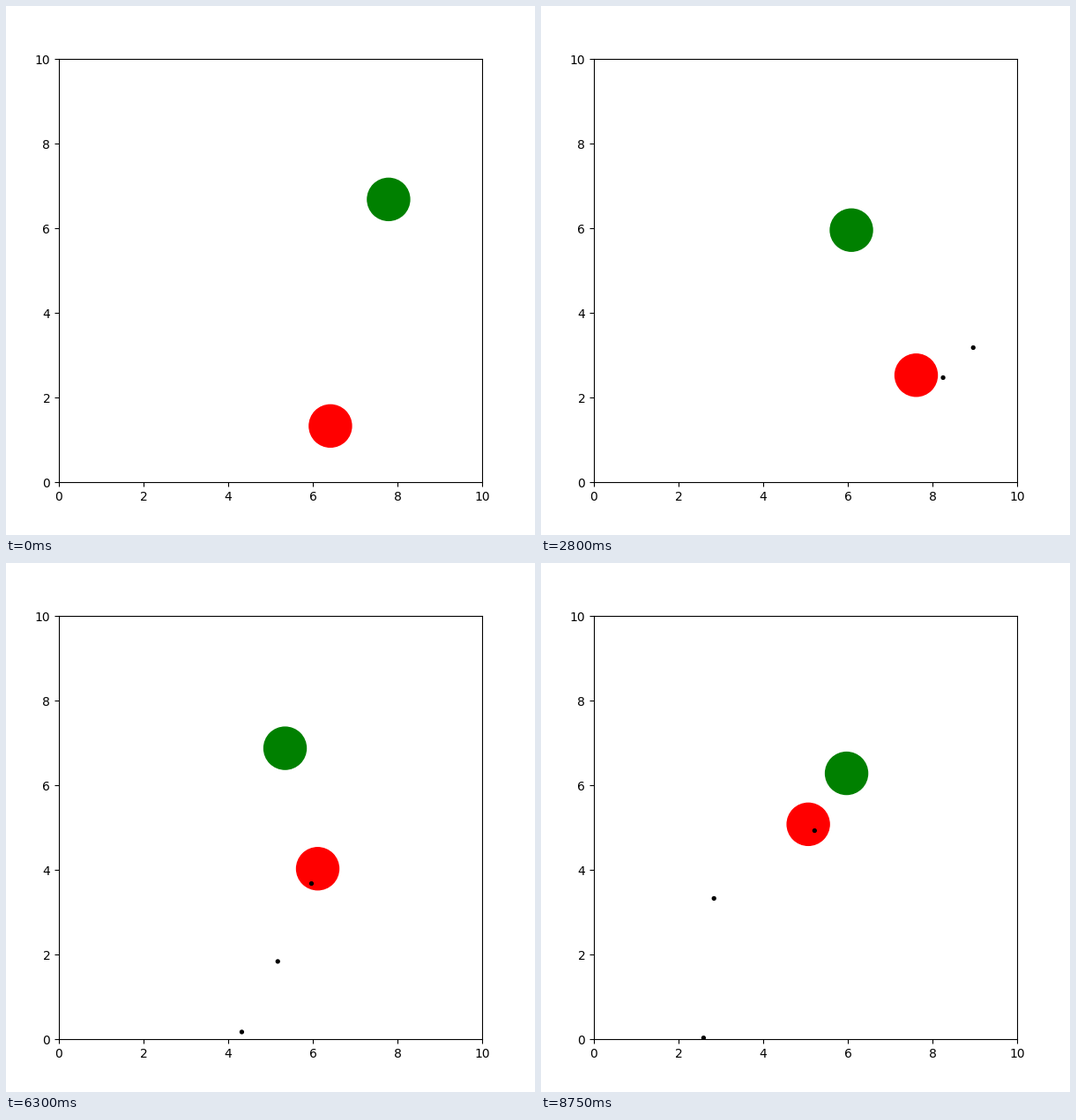
Animation of 600x600 px, one loop 9100 ms. Source, as a matplotlib script:

```python
import numpy as np
import matplotlib.pyplot as plt
from matplotlib.animation import FuncAnimation

FRAMES, INTERVAL = 26, 350
RADIUS, SHOT_RADIUS = 0.5, 0.04
RED_SPEED, SHOT_SPEED = 0.15, 0.45
RED_START = np.array([6.415, 1.326])
TURN = 8          # step at which the red disc reverses in x
RELOAD = 4        # steps between shots
HEADINGS = np.radians([36, 23.7, 215.6, 215, 186.4, 86, 180])

# Where the green disc changes course: step -> position
COURSE = {0: (7.79, 6.68), 1: (7.58, 6.89), 11: (5.79, 5.77),
          15: (5.425, 6.54), 21: (5.30, 7.055), 25: (5.97, 6.28)}


def red_pos(i):
    run = TURN - abs(i - TURN)
    return RED_START + RED_SPEED * np.array([run, i])


def green_pos(i):
    """Straight legs; every second one slows down towards its end."""
    steps = list(COURSE)
    leg = min(np.searchsorted(steps, i, side="right"), len(steps) - 1)
    start, end = steps[leg - 1], steps[leg]
    u = (i - start) / (end - start)
    if leg % 2 == 0:
        u = 1 - (1 - u) ** 1.5
    a, b = np.array(COURSE[start]), np.array(COURSE[end])
    return a + (b - a) * u


def shot_pos(k, i):
    fired = k * RELOAD
    heading = np.array([np.cos(HEADINGS[k]), np.sin(HEADINGS[k])])
    return red_pos(fired) + SHOT_SPEED * (i - fired - 1) * heading


def is_flying(k, i, pos):
    inside = np.all((pos >= 0) & (pos <= 10))
    hit = np.hypot(*(pos - green_pos(i))) < RADIUS
    return bool(i > k * RELOAD and inside and not hit)


fig, ax = plt.subplots(figsize=(6, 6), dpi=100)
fig.subplots_adjust(left=0.1, right=0.9, bottom=0.1, top=0.9)
ax.set_xlim(0, 10)
ax.set_ylim(0, 10)


def disc(radius, color):
    return ax.add_patch(plt.Circle((0, 0), radius, color=color))


red = disc(RADIUS, "red")
green = disc(RADIUS, "green")
shots = [disc(SHOT_RADIUS, "black") for _ in HEADINGS]


def update(i):
    red.center = red_pos(i)
    green.center = green_pos(i)
    for k, shot in enumerate(shots):
        shot.center = shot_pos(k, i)
        shot.set_visible(is_flying(k, i, shot.center))
    return red, green, *shots


anim = FuncAnimation(fig, update, frames=FRAMES, interval=INTERVAL,
                     repeat=True, repeat_delay=0)
plt.show()
```
